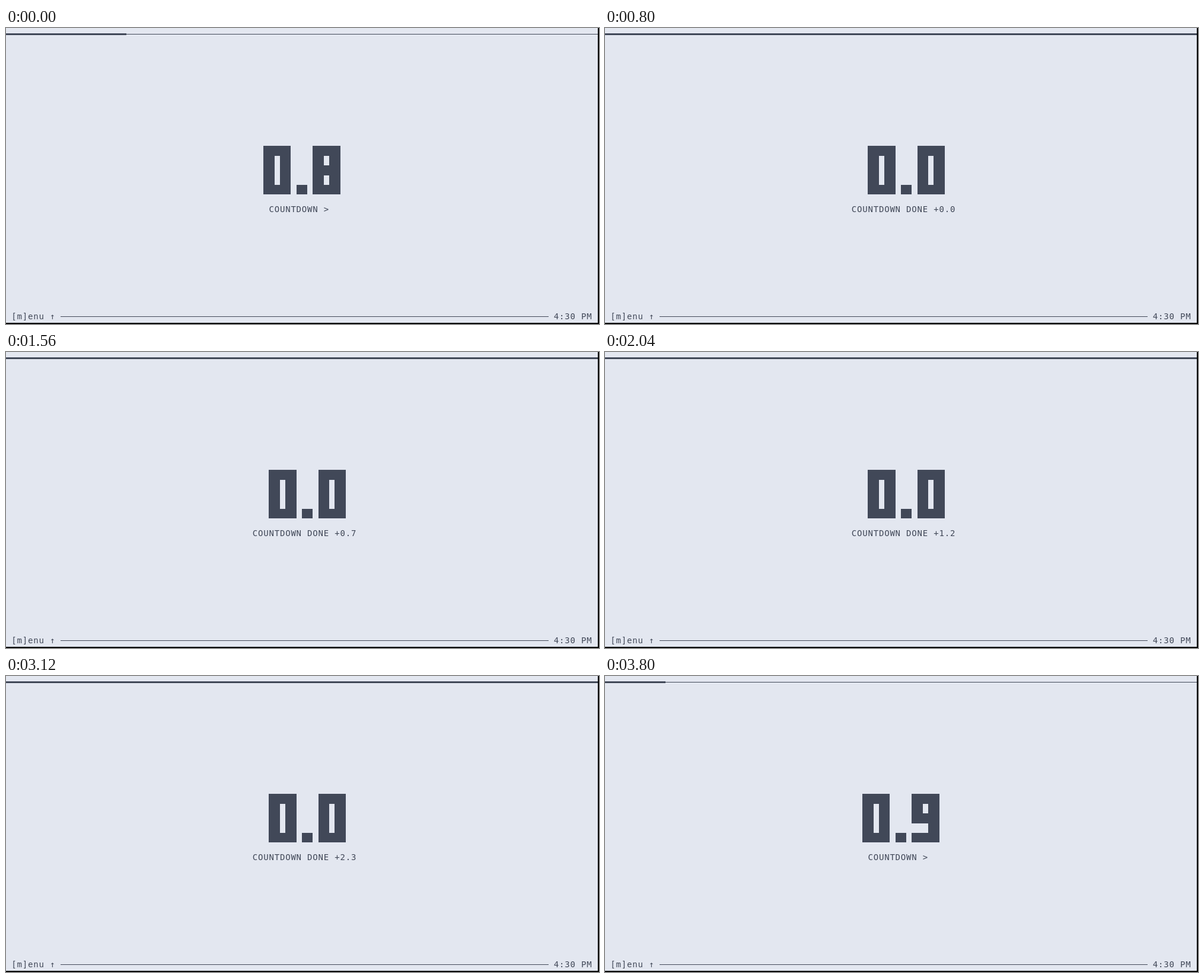
These frames come from a looping animation (1000x500 px, 3920 ms). An HTML page with a canvas:

```html
<!DOCTYPE html>
<html lang="en">
<head>
<meta charset="utf-8">
<title>Countdown</title>
<style>
  html, body { margin: 0; width: 100%; height: 100%; overflow: hidden; background: #000; }
  canvas { display: block; }
</style>
</head>
<body>
<canvas id="stage" width="1000" height="500"></canvas>
<script>
const ctx = document.getElementById('stage').getContext('2d');
const BG = '#e3e7f0', FG = '#414858';
const COLS = 108, CELL_W = 9.238, CELL_H = 16.45, DIGIT_TOP = 199.2;

// Length of each screen update in units of 40 ms
const UNIT = 40;
const HOLDS = [...'23232233223223232323223232323223232232123'].map(Number);
const LOOP = UNIT * HOLDS.reduce((a, b) => a + b, 0);

// Every digit is five rows: full, holed, left part, right part
const ROWS = { F: '11111', H: '11011', L: '11000', R: '00011' };
const DIGITS = 'FHHHF RRRRR FRFLF FRFRF HHFRR FLFRF FLFHF FRRRR FHFHF FHFRF'.split(' ');

const DONE = 8, FIRST_OVERTIME = 9, STOPPED = 38, STARTED = 39, RESUMED = 40;

const colX = col => Math.round(col * CELL_W);
const rowY = row => Math.round(DIGIT_TOP + row * CELL_H);

function box(x0, y0, x1, y1) {
  ctx.fillRect(x0, y0, x1 - x0, y1 - y0);
}

function text(str, col, baseline) {
  ctx.fillText(str, col * CELL_W, baseline);
}

function drawDigit(n, col) {
  [...DIGITS[n]].forEach((key, r) => {
    [...ROWS[key]].forEach((on, c) => {
      if (on === '1') box(colX(col + c), rowY(r), colX(col + c + 1), rowY(r + 1));
    });
  });
}

function drawClock(tenths, col) {
  drawDigit(Math.floor(tenths / 10), col);
  box(colX(col + 6), rowY(4), colX(col + 8), rowY(5));
  drawDigit(tenths % 10, col + 9);
}

function drawBar(progress) {
  const end = colX(Math.round(COLS * progress));
  box(0, 10, 998, 11);
  box(0, 9, end, 12);
}

function stateAt(step) {
  if (step >= STOPPED) {
    return {
      tenths: step < RESUMED ? 10 : 9,
      label: step < STARTED ? 'COUNTDOWN []' : 'COUNTDOWN >'
    };
  }
  if (step < DONE) return { tenths: 8 - step, label: 'COUNTDOWN >' };

  const over = Math.max(0, step - FIRST_OVERTIME);
  const left = 20 - (step - DONE);   // blinks while this counts down
  return {
    tenths: 0,
    done: true,
    hidden: left >= 0 && left % 8 < 4 && step < 29,
    label: 'COUNTDOWN DONE +' + (over / 10).toFixed(1)
  };
}

function stepAt(ms) {
  let step = 0, end = HOLDS[0] * UNIT;
  while (ms >= end && step < HOLDS.length - 1) end += HOLDS[++step] * UNIT;
  return step;
}

function draw(step) {
  const s = stateAt(step);
  ctx.fillStyle = '#000';
  ctx.fillRect(0, 0, 1000, 500);
  ctx.fillStyle = BG;
  ctx.fillRect(0, 0, 998, 498);

  ctx.fillStyle = FG;
  ctx.font = '14px "DejaVu Sans Mono", monospace';
  ctx.letterSpacing = (CELL_W - ctx.fontAdvance) + 'px';

  drawBar(1 - s.tenths / 10);
  if (!s.hidden) drawClock(s.tenths, s.done ? 48 : 47);
  text(s.label, s.done ? 45 : 48, 311);

  text('[m]enu ↑', 1, 492);
  box(colX(10), 487, colX(99), 488);
  text('4:30 PM', 100, 492);
}

ctx.font = '14px "DejaVu Sans Mono", monospace';
ctx.fontAdvance = ctx.measureText('0').width;

const start = performance.now();
function tick() {
  draw(stepAt((performance.now() - start) % LOOP));
  requestAnimationFrame(tick);
}
tick();
</script>
</body>
</html>
```
